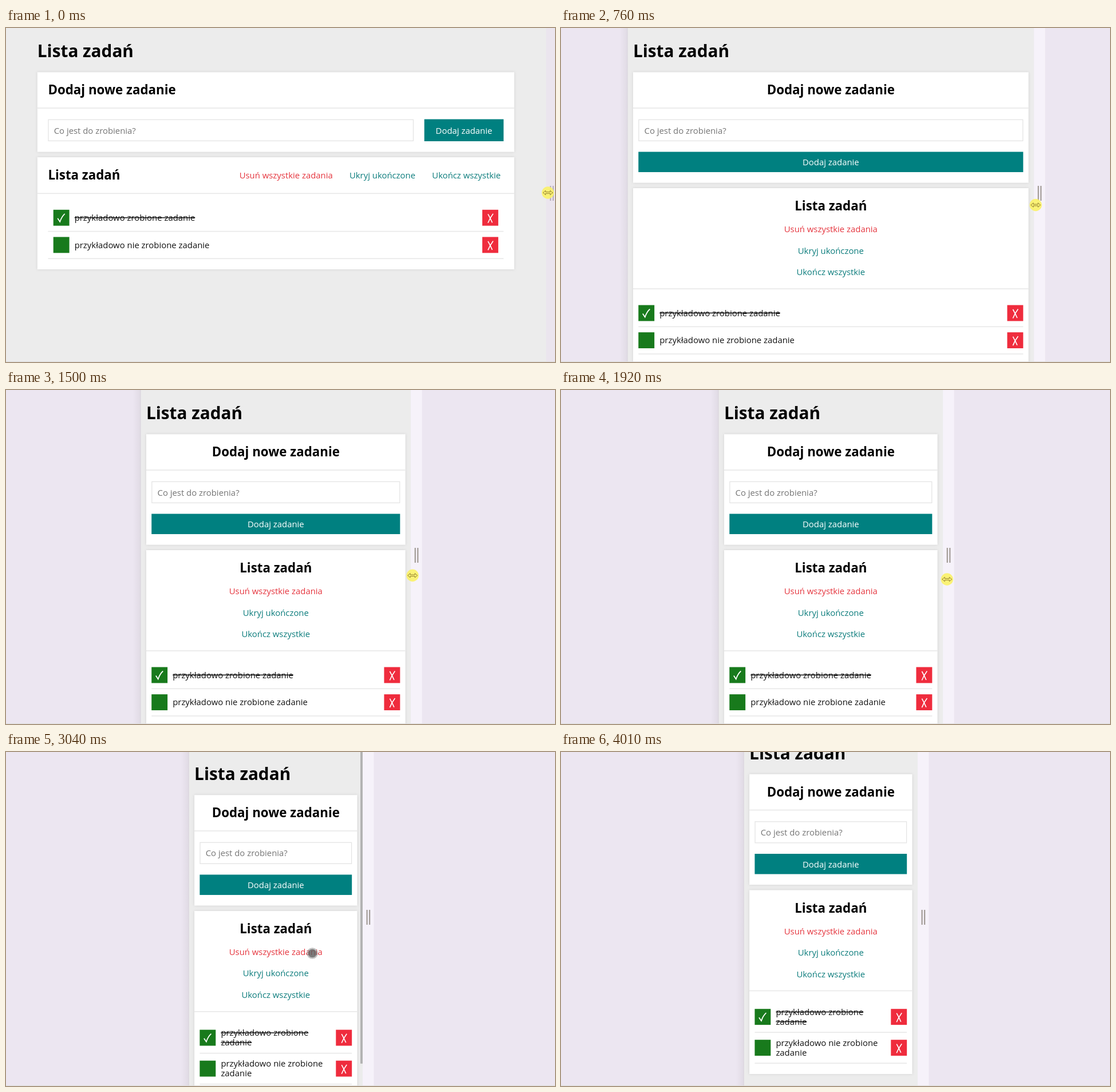
An HTML page that plays this animation: 959x584 px, repeating every 4.51 s.

```html
<!DOCTYPE html>
<html lang="pl">
<head>
<meta charset="utf-8">
<title>Lista zadań</title>
<style>
  html, body { margin: 0; width: 100%; height: 100%; overflow: hidden; background: #ece6f1; }
  svg { display: block; width: 100%; height: 100%; }
  text { font: 14.88px "Open Sans", "Noto Sans", sans-serif; fill: #111; }
  .h1 { font-size: 29.76px; font-weight: 700; fill: #000; }
  .h2 { font-size: 22.32px; font-weight: 700; fill: #000; }
  .hint { fill: #757575; }
  .light { fill: #fff; }
  .danger { fill: #e5343d; }
  .link { fill: #0b7c7c; }
  .done { text-decoration: line-through; }
  .mid { text-anchor: middle; }
  .card { fill: #fff; filter: drop-shadow(0 0 2px #d0d0d0); }
</style>
</head>
<body>
<svg id="stage" viewBox="0 0 959 584" preserveAspectRatio="none"></svg>
<script>
const LOOP = 4510, TICK = 53.2, START = 60;
const RELEASE = 2710, POINTER_GONE = 3990;
const STAGE_W = 959, STAGE_H = 584, CENTER = 471.3;
const TEAL = '#008080', GREEN = '#187a1c', RED = '#ef2c3d', LINE = '#e8e8e8';

// [time, x]: left edge of the shrinking page
const EDGE = [[0, -1], [486, 75], [1018, 158.3], [1497, 235.5], [2294, 310.5], [RELEASE, 319.6]];
// [time, x, y]: pointer once the handle is let go
const FREE_PATH = [[RELEASE, 635, 345], [3040, 535, 352], [3290, 537, 357], [3840, 559, 508], [3960, 591, 535]];

const TASKS = [
  { lines: ['przykładowo zrobione', 'zadanie'], width: 210, done: true },
  { lines: ['przykładowo nie zrobione', 'zadanie'], width: 235, done: false },
];

const snap = t => t < START ? 0 : START + Math.floor((t - START) / TICK) * TICK;
const progress = (t, from, to) => Math.min(1, Math.max(0, (t - from) / (to - from)));
const smooth = u => u * u * (3 - 2 * u);

// Smooth curve through key points, flat outside them
function curve(keys, t, i = 1) {
  const last = keys.length - 1;
  if (t >= keys[last][0]) return keys[last][i];
  const n = keys.findIndex(k => k[0] > t) - 1;
  const slope = k => {
    const a = keys[Math.max(0, k - 1)], b = keys[Math.min(last, k + 1)];
    return (b[i] - a[i]) / (b[0] - a[0]);
  };
  const a = keys[n], b = keys[n + 1], h = b[0] - a[0], u = (t - a[0]) / h;
  return a[i] + (b[i] - a[i]) * smooth(u)
    + h * u * (1 - u) * (slope(n) * (1 - u) - slope(n + 1) * u);
}

const leftEdge = t => curve(EDGE, t);
const scrollAt = t => 38.5 * smooth(progress(t, 3005, 3250));

const rect = (x, y, w, h, fill, extra = '') =>
  `<rect x="${x}" y="${y}" width="${w}" height="${h}" fill="${fill}" ${extra}/>`;
const text = (x, y, str, cls = '') => `<text x="${x}" y="${y}" class="${cls}">${str}</text>`;
const card = (x, y, w, h) => rect(x, y, w, h, '#fff', 'class="card"');
const rule = (x, y, w) => rect(x, y - 0.8, w, 1.6, LINE);
const stroke = (d, color, width) =>
  `<path d="${d}" fill="none" stroke="${color}" stroke-width="${width}"/>`;

function taskRow(task, left, right, top, inset) {
  const size = 27.9, x = left + inset, end = right - inset;
  const wrapped = task.width > end - x - 74;
  const height = wrapped ? 54 : 47.6, mid = top + height / 2;
  const lines = wrapped ? task.lines : [task.lines.join(' ')];
  const cx = end - size / 2;
  let out = rect(x, mid - 14, size, size, GREEN) + rect(end - size, mid - 14, size, size, RED)
    + stroke(`M${cx - 4} ${mid - 6.5}q4 7 7.5 15M${cx + 5} ${mid - 7}q-6 8 -9 16`, '#fff', 1.6);
  if (task.done) out += stroke(`M${x + 7.5} ${mid + 1}l4 6q3 -9 8.5 -14`, '#fff', 1.7);
  lines.forEach((line, i) => {
    const y = mid + 5.2 + (i - (lines.length - 1) / 2) * 17;
    out += text(x + 37, y, line, task.done ? 'done' : '');
  });
  return { out: out + rule(left, top + height, right - left), bottom: top + height };
}

function page(x, w, narrow) {
  const pad = narrow ? 9.3 : 18.6;
  const left = x + pad, right = x + w - pad, inner = right - left, mid = x + w / 2;
  const buttonW = narrow ? inner : 138.5, buttonY = narrow ? 216.5 : 159.5;
  const buttonH = narrow ? 35.5 : 38.5, inputW = narrow ? inner : inner - buttonW - 18.6;
  const listY = narrow ? 280 : 226, headEnd = narrow ? 456 : 289.3;
  const heading = (y, str) => narrow ? text(mid, y, str, 'h2 mid') : text(left, y, str, 'h2');

  let top = headEnd + 18.7, rows = '';
  for (const task of TASKS) {
    const row = taskRow(task, left, right, top, narrow ? 0 : 9.3);
    rows += row.out;
    top = row.bottom;
  }
  const links = [['Usuń wszystkie zadania', 'danger', 380],
    ['Ukryj ukończone', 'link', 211.7], ['Ukończ wszystkie', 'link', 65]]
    .map(([str, cls, fromRight], i) => narrow
      ? text(mid, 357 + i * 37.5, str, cls + ' mid')
      : text(right - fromRight, 263, str, cls + ' mid')).join('');

  return text(x, 51, 'Lista zadań', 'h1')
    + card(x, 77.3, w, listY - 86.7)
    + heading(116, 'Dodaj nowe zadanie') + rule(x, 140, w)
    + rect(left + 0.6, 160.3, inputW - 1.2, 37, '#fff', 'stroke="#e4e4e4" stroke-width="1.3"')
    + text(left + 10.3, 184.5, 'Co jest do zrobienia?', 'hint')
    + rect(right - buttonW, buttonY, buttonW, buttonH, TEAL)
    + text(right - buttonW / 2, narrow ? 240 : 184.5, 'Dodaj zadanie', 'light mid')
    + card(x, listY, w, top + 18.8 - listY)
    + heading(listY + 39.4, 'Lista zadań') + rule(x, headEnd, w)
    + links + rows;
}

function pointer(t, end) {
  if (t >= POINTER_GONE) return '';
  const held = t < RELEASE;
  const x = held ? end + 3 + 9 * progress(t, 1500, 2300) : curve(FREE_PATH, t);
  const y = held ? 288 + 57 * (t / RELEASE) ** 0.76 : curve(FREE_PATH, t, 2);
  const arrow = 'M-8.5 0l4.5 -3.7v2.4h8v-2.4l4.5 3.7l-4.5 3.7v-2.4h-8v2.4z';
  const mark = held
    ? `<circle r="10.7" fill="#fbf267" opacity=".9"/>${stroke(arrow, '#94802f', 1)}`
    : '<circle r="9.8" fill="#888" opacity=".5"/><circle r="7.3" fill="#555" opacity=".65"/>';
  return `<g transform="translate(${x} ${y})">${mark}</g>`;
}

function scene(t) {
  const edge = leftEdge(t), end = 2 * CENTER - edge, view = end - edge;
  const narrow = view <= 713;
  // the wide layout trails the frame being dragged
  const width = narrow ? view : 2 * (CENTER - leftEdge(Math.max(0, t - 80)));
  const cardW = Math.min(833, width - 19);
  const cardX = edge + (width - cardW) / 2;
  const scroll = scrollAt(t), scrolling = t > 2990 && t < 3270;
  const idle = t < START, grip = idle ? '#b5a9bb' : '#9c958f';

  return `<defs>
      <clipPath id="view">${rect(edge, 0, view, STAGE_H, '#000')}</clipPath>
      <linearGradient id="shade"><stop stop-color="#888" stop-opacity="0"/>
        <stop offset="1" stop-color="#888" stop-opacity=".12"/></linearGradient>
    </defs>`
    + rect(0, 0, STAGE_W, STAGE_H, '#ece6f1')
    + rect(edge - 14, 0, 14, STAGE_H, 'url(#shade)')
    + rect(edge, 0, view, STAGE_H, '#ececec')
    + `<g clip-path="url(#view)"><g transform="translate(0 ${-scroll})">${page(cardX, cardW, narrow)}</g></g>`
    + rect(edge - 1, 0, 1, STAGE_H, '#d9d5dc')
    + (scrolling ? rect(end - 4, scroll * 0.9 - 2, 4, 545, '#b3b3b3') : '')
    + rect(end, 0, 19.5, STAGE_H, idle ? '#ebe5ee' : '#f6f2fa')
    + rect(end + 6.6, 276, 2, 26, grip) + rect(end + 11.2, 276, 2, 26, grip)
    + rect(0, 583, STAGE_W, 1, '#dedede')
    + pointer(t, end);
}

const stage = document.getElementById('stage');
const began = performance.now();
let shown = -1;

function draw() {
  const t = snap((performance.now() - began) % LOOP);
  if (t !== shown) stage.innerHTML = scene(shown = t);
  requestAnimationFrame(draw);
}
draw();
</script>
</body>
</html>
```
